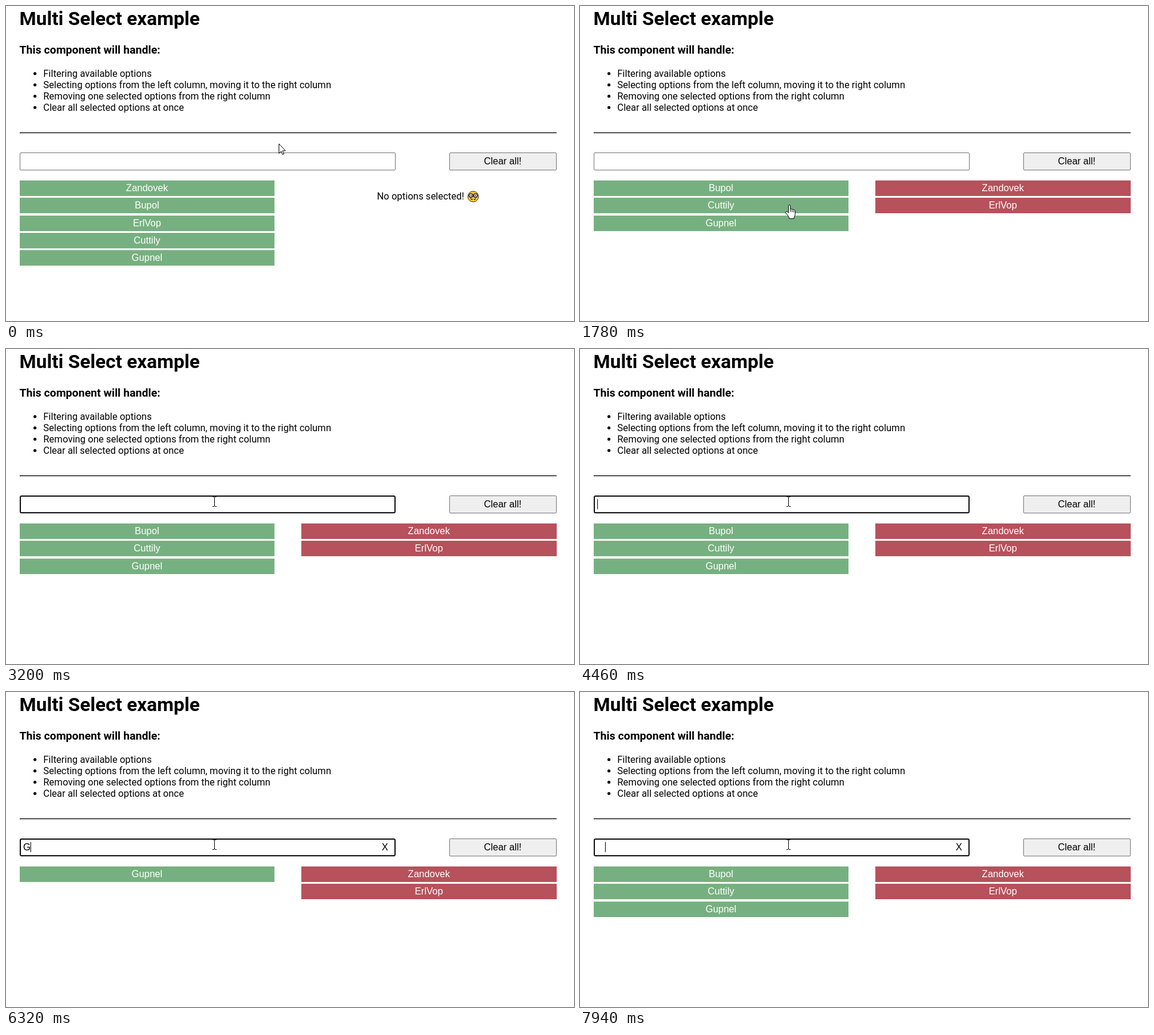
These frames come from a looping animation (952x529 px, 8 s). An HTML page:

```html
<!DOCTYPE html>
<html lang="en">
<head>
<meta charset="utf-8">
<title>Multi Select example</title>
<style>
  html, body { margin: 0; width: 100%; height: 100%; overflow: hidden; background: #fff; }
  body { position: relative; color: #000; font: 16px/19px Roboto, sans-serif; }
  body > * { position: absolute; box-sizing: border-box; margin: 0; left: 22.5px; white-space: pre; }
  h1 { top: 2px; font-size: 32px; line-height: 38px; }
  h3 { top: 63px; font-size: 18.72px; line-height: 22px; }
  ul { top: 104px; padding: 0 0 0 40px; white-space: normal; }
  hr { top: 212px; width: 900px; border: 1px inset gray; }
  .control { top: 246px; height: 30px; border: 1px solid #767676; border-radius: 2px; }
  #field { width: 630px; }
  #field.hover { border-color: #4f4f4f; }
  #field.focus { border: 2px solid #101010; border-radius: 3px; }
  #clear { left: 742.5px; width: 180px; background: #efefef; padding-top: 5px; text-align: center; }
  #clear, #typed, #reset, .option { font: 16px/17px "Liberation Sans", Arial, sans-serif; }
  #typed { left: 28.7px; top: 252px; height: 17px; }
  #caret { position: absolute; left: 100%; top: 0; width: 1px; height: 17px; background: #000; }
  #reset { left: 629.7px; top: 252px; }
  .option { width: 427.5px; height: 26px; padding-top: 4px; color: #fff; text-align: center; }
  #empty { left: 621.7px; top: 310px; }
  #empty svg { position: absolute; left: 151.8px; top: -.5px; }
  #pointer { left: 0; top: 0; overflow: visible; fill: #fff; stroke: #000; }
</style>
</head>
<body>
<h1>Multi Select example</h1>
<h3>This component will handle:</h3>
<ul>
  <li>Filtering available options</li>
  <li>Selecting options from the left column, moving it to the right column</li>
  <li>Removing one selected options from the right column</li>
  <li>Clear all selected options at once</li>
</ul>
<hr>
<div id="field" class="control"></div>
<div id="typed"><span id="value"></span><i id="caret"></i></div>
<div id="reset">X</div>
<div id="clear" class="control">Clear all!</div>
<div id="empty">No options selected!<svg width="20" height="20" viewBox="0 0 20 20">
  <circle cx="10" cy="10" r="9" fill="#ffc93a" stroke="#3b2c12"/>
  <g fill="#fff" stroke="#1c1710" stroke-width="1.4">
    <circle cx="6.2" cy="8.2" r="3.1"/><circle cx="13.8" cy="8.2" r="3.1"/>
    <path d="M9.2 8q.8-.6 1.6 0M5.5 13.2q4.5 4.4 9 0" fill="none"/>
    <path d="M9 15h2v1.5H9Z" stroke="none"/>
  </g>
  <circle cx="6.4" cy="8.3" r="1"/><circle cx="13.6" cy="8.3" r="1"/>
</svg></div>
<svg id="pointer" width="1" height="1">
  <path id="arrow" d="M.5.5V16.5L4.2 13 6.6 18.5 8.8 17.5 6.5 12H11.5Z"/>
  <g id="hand" transform="translate(-7.1 -.5)">
    <path d="M5.5 13V2.2a1.6 1.6 0 0 1 3.2 0V8a1.5 1.5 0 0 1 2.8.6 1.5 1.5 0 0 1 2.8.7 1.4 1.4 0 0 1 2.4 1V16c0 3-1.8 4-2 7.5H7C6.7 20 3 17.5 1 13.8c-.8-1.6 1-3 2.4-1.8L5.5 14Z"/>
    <path d="M8.7 8v4M11.5 9v3.5M14.2 10v3" fill="none"/>
  </g>
  <path id="beam" fill="none" d="M-3 -8H-1L.5-7 2-8H4M.5-7V8M-3 8.5H-1L.5 7.5 2 8.5H4"/>
</svg>
<script>
const LOOP = 8000, FOCUS = 2720;
const $ = id => document.getElementById(id);
const show = (node, on) => { node.style.visibility = on ? "visible" : "hidden"; };

const options = [
  ["Zandovek", 1060], ["Bupol"], ["ErlVop", 1780], ["Cuttily"], ["Gupnel"]
].map(([name, pickedAt = Infinity]) => {
  const node = document.createElement("div");
  node.className = "option";
  node.textContent = name;
  document.body.insertBefore(node, $("pointer"));
  return { name, pickedAt, node };
});

// [time, text, caret visible]
const typing = [
  [0, "", false], [FOCUS, "", true], [3200, "", false],
  [3680, "g", true], [3910, "gu", true], [4380, "g", true], [4460, "", true], [5000, "", false],
  [5230, "G", true], [5690, "Gu", true], [5920, "Gup", true], [6150, "Gu", true],
  [6320, "G", true], [6390, "", true], [6470, "", false],
  [6620, " ", true], [6850, "  ", true], [7000, "   ", true],
  [7250, "   g", true], [7480, "   gu", true], [7810, "   g", true], [7940, "   ", true]
];

// [first step, last step, steps, x, y]
const moves = [
  [380, 840, 7, 378, 314], [1138, 1530, 6, 351, 334], [1857, 2010, 3, 347, 347],
  [2180, 2550, 6, 349, 260], [2720, 2720, 1, 349, 251], [2790, 2790, 1, 349, 256]
];

function pointerAt(t) {
  let x = 457, y = 231;
  for (const [start, end, steps, toX, toY] of moves) {
    if (t < start) break;
    const gap = (end - start) / (steps - 1) || 1;
    const p = Math.min(1, (Math.floor((t - start) / gap + 1e-6) + 1) / steps);
    const eased = p * p * (3 - 2 * p);
    x += (toX - x) * eased;
    y += (toY - y) * eased;
  }
  return [Math.round(x), Math.round(y)];
}

function layOutOptions(t, query) {
  let left = 0, right = 0;
  for (const { name, pickedAt, node } of options) {
    const picked = t >= pickedAt;
    const visible = picked || name.toLowerCase().includes(query);
    show(node, visible);
    if (!visible) continue;
    const row = picked ? right++ : left++;
    node.style.left = (picked ? 495 : 22.5) + "px";
    node.style.top = 293 + row * 29.25 + "px";
    node.style.background = picked ? "#b7515b" : "#77b080";
  }
  show($("empty"), right === 0);
}

function render(t) {
  const [, text, caret] = typing.findLast(([time]) => time <= t);
  layOutOptions(t, text.trim().toLowerCase());
  $("value").textContent = text;
  show($("caret"), caret);
  show($("reset"), text !== "");

  const [x, y] = pointerAt(t);
  const shape = y >= 246 && y < 276 ? "beam" : y >= 293 ? "hand" : "arrow";
  $("pointer").style.transform = `translate(${x}px, ${y}px)`;
  for (const id of ["arrow", "hand", "beam"]) show($(id), id === shape);
  $("field").className = "control " + (t >= FOCUS ? "focus" : shape === "beam" ? "hover" : "");
}

const begin = performance.now();
function tick() {
  render((performance.now() - begin) % LOOP);
  requestAnimationFrame(tick);
}
tick();
</script>
</body>
</html>
```
